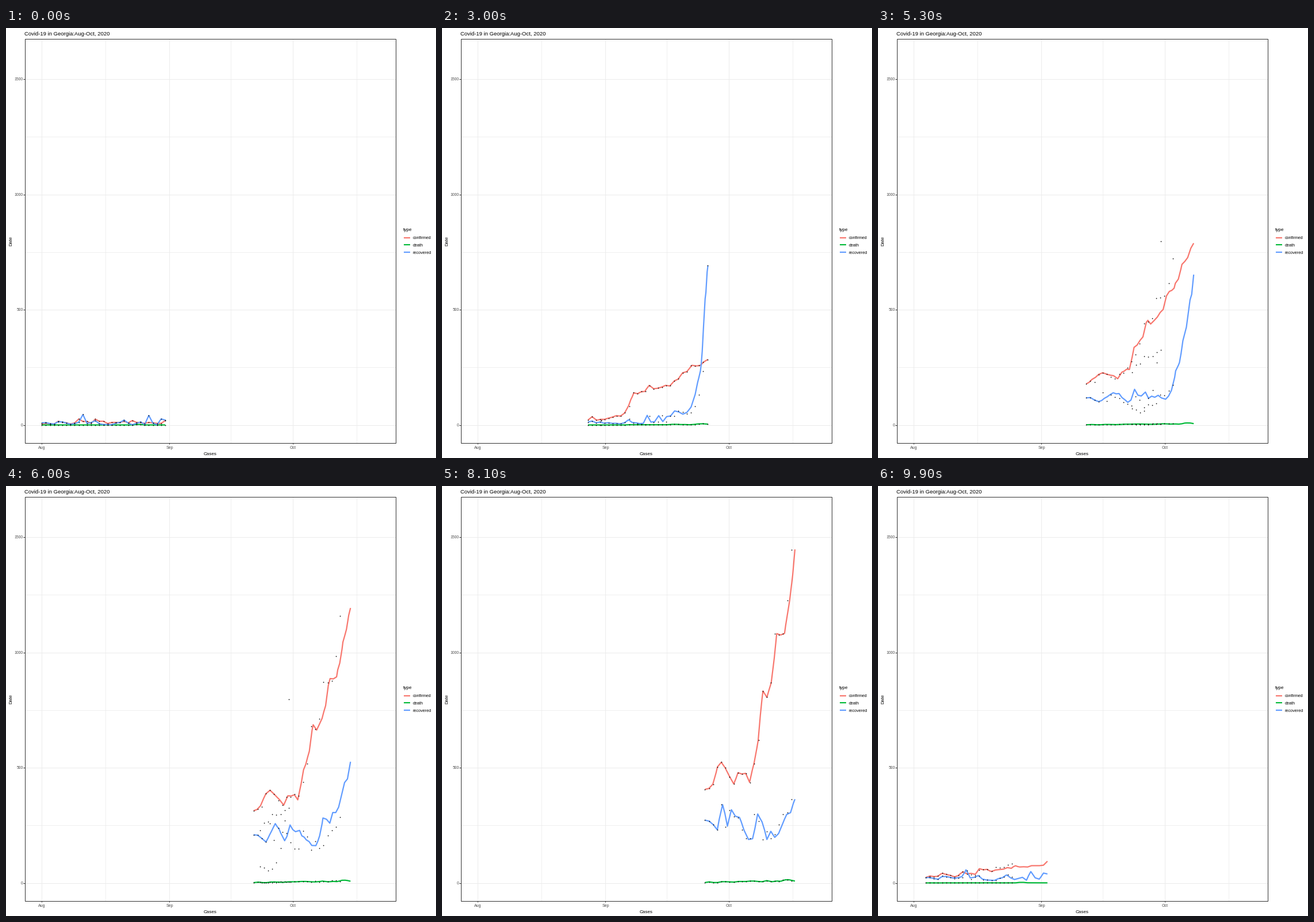
Write a matplotlib script that moves like this. It is 748x748 px and loops after 10 s.

```python
import numpy as np
import matplotlib
import matplotlib.pyplot as plt
from matplotlib.animation import FuncAnimation
from matplotlib.patches import Rectangle

matplotlib.rcParams["font.family"] = "Liberation Sans"

SIZE, DPI = 748, 64
PT = 72 / DPI                      # points per pixel
FRAMES, INTERVAL = 100, 100
PATH_POINTS = 50                   # vertices of a line while it morphs
LEFT, TOP, RIGHT, BOTTOM = 33, 18.5, 678.5, 721.5
COLORS = {"confirmed": "#F8766D", "death": "#00BA38", "recovered": "#619CFF"}

# Daily counts for each month
aug = {
    "confirmed": [3, 8, 4, 4, 16, 12, 9, 4, 9, 26, 15, 15, 7, 25, 16, 16,
                  6, 11, 11, 11, 16, 9, 19, 11, 10, 7, 11, 9, 7, 7, 19],
    "death": [0] * 23 + [2, 2] + [0] * 6,
    "recovered": [9, 10, 6, 4, 14, 13, 8, 3, 6, 12, 45, 7, 10, 19, 5, 2,
                  2, 1, 8, 11, 21, 8, 1, 7, 13, 2, 41, 8, 1, 26, 21],
}
sep = {
    "confirmed": [24, 40, 23, 27, 26, 31, 37, 45, 44, 58, 92, 160, 155, 164,
                  165, 196, 180, 183, 188, 197, 194, 220, 228, 260, 266,
                  298, 295, 298, 315, 326],
    "death": [0] * 10 + [1] * 11 + [3, 3, 2, 2, 1, 2, 5, 6, 4],
    "recovered": [13, 18, 10, 14, 7, 9, 6, 7, 5, 10, 24, 9, 6, 1, 1, 44,
                  12, 15, 45, 14, 40, 44, 70, 65, 54, 62, 88, 150, 270, 796],
}
octo = {
    "confirmed": [448, 452, 472, 555, 577, 550, 508, 474, 527, 520, 523, 480,
                  570, 682, 918, 888, 958, 1193, 1186, 1194, 1352, 1596],
    "death": [2, 5, 2, 2, 6, 6, 5, 4, 7, 7, 7, 9,
              9, 7, 6, 11, 6, 9, 8, 15, 15, 9],
    "recovered": [300, 295, 279, 254, 375, 268, 348, 319, 313, 253, 208, 212,
                  329, 293, 208, 245, 214, 233, 280, 328, 336, 399],
}


def px(day):
    return 62.2 + 7.161 * day


def py(count):
    return 690.5 - 0.4013 * count


def series(counts, first_day):
    return np.column_stack([first_day + np.arange(len(counts)), counts]).astype(float)


def densify(path):
    """Split the longest pieces evenly until the path has PATH_POINTS vertices."""
    length = np.hypot(*np.diff(path, axis=0).T)
    parts = np.ones(len(length), int)
    for _ in range(PATH_POINTS - len(path)):
        parts[np.argmax(length / parts)] += 1
    out = [a + (b - a) * k / n
           for a, b, n in zip(path, path[1:], parts) for k in range(n)]
    return np.array(out + [path[-1]])


MONTHS = [{kind: series(c, first) for kind, c in month.items()}
          for month, first in ((aug, 0), (sep, 31), (octo, 61))]
DENSE = [{kind: densify(p) for kind, p in month.items()} for month in MONTHS]

# (last still frame, arrival frame, from month, to month)
MOVES = [(11, 33, 0, 1), (45, 67, 1, 2), (79, 100, 2, 0)]


def pose(frame):
    """Month left, month entered and progress between them."""
    for start, end, a, b in MOVES:
        if frame <= start:
            return a, a, 0.0
        if frame < end:
            return a, b, (frame - start) / (end - start)
    return 0, 0, 0.0


def mix(a, b, t):
    return a + (b - a) * t


def mix_dots(a, b, t):
    n = min(len(a), len(b))
    return np.vstack([mix(a[:n], b[:n], t), a[n:]])   # unmatched dots wait


fig = plt.figure(figsize=(SIZE / DPI, SIZE / DPI), dpi=DPI, facecolor="white")
ax = fig.add_axes([0, 0, 1, 1])
ax.set_xlim(0, SIZE)
ax.set_ylim(SIZE, 0)
ax.axis("off")


def stroke(xs, ys, color, width, z=1):
    return ax.plot(xs, ys, color=color, lw=width * PT, zorder=z,
                   solid_capstyle="butt", solid_joinstyle="round")[0]


def label(x, y, text, size, color="black", **kw):
    ax.text(x, y, text, fontsize=size * PT, color=color, **kw)


def grid(xs, ys, width):
    for x in xs:
        stroke([x, x], [TOP, BOTTOM], "#EBEBEB", width)
    for y in ys:
        stroke([LEFT, RIGHT], [y, y], "#EBEBEB", width)


month_x = [62.5, 284.5, 499.5]
count_y = {0: 690.5, 500: 489.5, 1000: 289.5, 1500: 88.5}
grid([173, 391.5, 610], [188.5, 389.5, 590], 0.8)
grid(month_x, count_y.values(), 1)

for x, name in zip(month_x, ("Aug", "Sep", "Oct")):
    stroke([x, x], [BOTTOM, BOTTOM + 2.5], "#333333", 1)
    label(x, 732.5, name, 7, "#4D4D4D", ha="center")
for count, y in count_y.items():
    stroke([LEFT - 2.5, LEFT], [y, y], "#333333", 1)
    label(29.5, y + 2.5, str(count), 6.7, "#4D4D4D", ha="right")

ax.add_patch(Rectangle((LEFT + 0.5, TOP), RIGHT - LEFT - 0.5, BOTTOM - TOP, fill=False,
                       ec="#333333", lw=PT, zorder=6))
label(32.5, 12.5, "Covid-19 in Georgia:Aug-Oct, 2020", 9.45)
label(355, 743, "Cases", 8.1, ha="center")
label(9, 370.5, "Date", 8.1, rotation=90, ha="center", va="center")
label(691, 353, "type", 8.2)

lines, dots = {}, {}
for i, (kind, color) in enumerate(COLORS.items()):
    y = 364.5 + 12.75 * i
    stroke([692.5, 703], [y, y], color, 2.13)
    label(708, y + 2.7, kind, 7.2)
    lines[kind] = stroke([], [], color, 2.2, z=3 + 0.1 * i)
    dots[kind] = ax.plot([], [], "o", color="black", ms=1.7 * PT, mew=0, zorder=5)[0]


def draw(frame):
    a, b, t = pose(frame)
    for kind in COLORS:
        if t:
            path = mix(DENSE[a][kind], DENSE[b][kind], t)
            marks = mix_dots(MONTHS[a][kind], MONTHS[b][kind], t)
        else:
            path = marks = MONTHS[a][kind]
        lines[kind].set_data(px(path[:, 0]), py(path[:, 1]))
        dots[kind].set_data(px(marks[:, 0]), py(marks[:, 1]))
    return [*lines.values(), *dots.values()]


anim = FuncAnimation(fig, draw, frames=FRAMES, interval=INTERVAL,
                     repeat=True, repeat_delay=0, blit=False)
plt.show()
```
